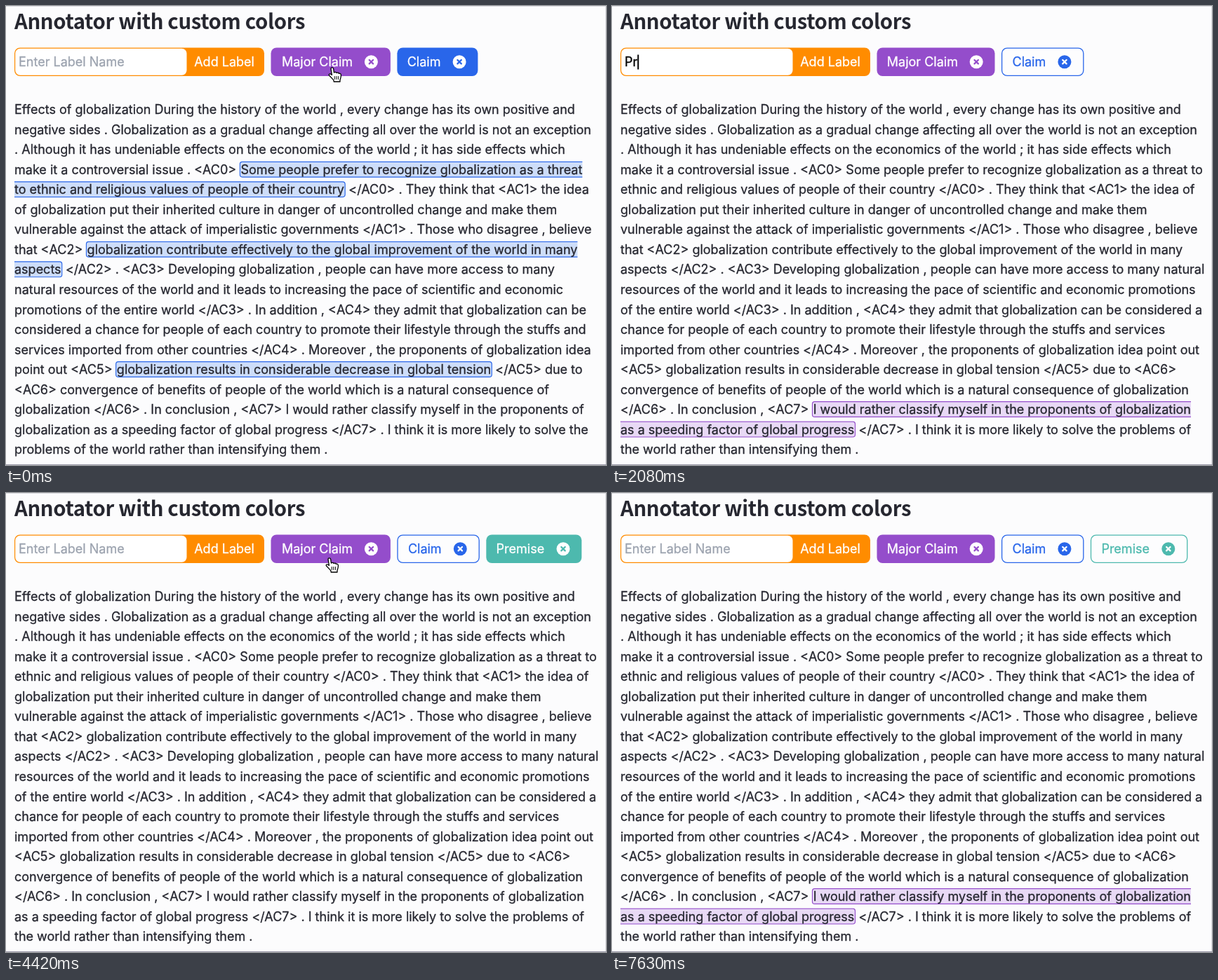
Write an HTML page with a canvas that moves like this. It is 855 by 655 pixels and loops after 7.67 s.

```html
<!DOCTYPE html>
<html lang="en">
<head>
<meta charset="utf-8">
<title>Annotator</title>
<style>
html, body { margin: 0; width: 100%; height: 100%; overflow: hidden; background: #fcfcfd; }
canvas { display: block; }
</style>
</head>
<body>
<canvas id="stage" width="855" height="655"></canvas>
<script>
const ctx = document.getElementById('stage').getContext('2d');
const LOOP = 7670;
const UI = '400 18px Inter, "Open Sans", sans-serif';
const HEAD = '700 29.3px "Noto Sans CJK JP", "Noto Sans CJK SC", "Noto Sans", sans-serif';
const INK = '#262730', ORANGE = '#ff8c00';
const LINE = 28.53, TOP = 59.5, HIGH = 40.5, ROUND = 8;

const labels = [
  { name: 'Major Claim', color: '#944dcb', tint: '#e8d9f5', width: 168 },
  { name: 'Claim', color: '#2966ea', tint: '#cdddf9', width: 115 },
  { name: 'Premise', color: '#4db9ae', tint: '#d8f0ee', width: 136 }
];

// Square brackets mark annotated spans; a span may continue on the next line.
const intro = [
  'Effects of globalization During the history of the world , every change has its own positive and',
  'negative sides . Globalization as a gradual change affecting all over the world is not an exception',
  '. Although it has undeniable effects on the economics of the world ; it has side effects which'
];
const claimText = [...intro,
  'make it a controversial issue . <AC0> [Some people prefer to recognize globalization as a threat',
  'to ethnic and religious values of people of their country] </AC0> . They think that <AC1> the idea',
  'of globalization put their inherited culture in danger of uncontrolled change and make them',
  'vulnerable against the attack of imperialistic governments </AC1> . Those who disagree , believe',
  'that <AC2> [globalization contribute effectively to the global improvement of the world in many',
  'aspects] </AC2> . <AC3> Developing globalization , people can have more access to many',
  'natural resources of the world and it leads to increasing the pace of scientific and economic',
  'promotions of the entire world </AC3> . In addition , <AC4> they admit that globalization can be',
  'considered a chance for people of each country to promote their lifestyle through the stuffs and',
  'services imported from other countries </AC4> . Moreover , the proponents of globalization idea',
  'point out <AC5> [globalization results in considerable decrease in global tension] </AC5> due to',
  '<AC6> convergence of benefits of people of the world which is a natural consequence of',
  'globalization </AC6> . In conclusion , <AC7> I would rather classify myself in the proponents of',
  'globalization as a speeding factor of global progress </AC7> . I think it is more likely to solve the',
  'problems of the world rather than intensifying them .'
];
const majorText = [...intro,
  'make it a controversial issue . <AC0> Some people prefer to recognize globalization as a threat to',
  'ethnic and religious values of people of their country </AC0> . They think that <AC1> the idea of',
  'globalization put their inherited culture in danger of uncontrolled change and make them',
  'vulnerable against the attack of imperialistic governments </AC1> . Those who disagree , believe',
  'that <AC2> globalization contribute effectively to the global improvement of the world in many',
  'aspects </AC2> . <AC3> Developing globalization , people can have more access to many natural',
  'resources of the world and it leads to increasing the pace of scientific and economic promotions',
  'of the entire world </AC3> . In addition , <AC4> they admit that globalization can be considered a',
  'chance for people of each country to promote their lifestyle through the stuffs and services',
  'imported from other countries </AC4> . Moreover , the proponents of globalization idea point out',
  '<AC5> globalization results in considerable decrease in global tension </AC5> due to <AC6>',
  'convergence of benefits of people of the world which is a natural consequence of globalization',
  '</AC6> . In conclusion , <AC7> [I would rather classify myself in the proponents of globalization',
  'as a speeding factor of global progress] </AC7> . I think it is more likely to solve the problems of',
  'the world rather than intensifying them .'
];
const plainText = majorText.map(s => s.replace(/[\[\]]/g, ''));

// Pointer path: time, x, y
const path = [
  [0, 465, 88], [220, 465, 88], [900, 197, 91], [3500, 197, 91], [4300, 461, 93],
  [4750, 461, 93], [5350, 513, 90], [5650, 513, 90], [6250, 640, -30], [LOOP, 640, -30]
];
const keys = [1880, 2030, 2200, 2380, 2520, 2660, 2800];
const FOCUS = 1300, ADDED = 3300;

function pointerAt(t) {
  const i = Math.max(1, path.findIndex(p => p[0] > t));
  const [a, b] = [path[i - 1], path[i]];
  const u = (t - a[0]) / (b[0] - a[0]);
  const e = u * u * (3 - 2 * u);
  return { x: a[1] + (b[1] - a[1]) * e, y: a[2] + (b[2] - a[2]) * e };
}

function selectedAt(t) {
  if (t < 240) return 1;
  if (t < ADDED) return 0;
  return t < 4750 ? 2 : 0;
}

function box(x, y, w, h, r, fill, stroke, lw) {
  ctx.beginPath();
  ctx.roundRect(x, y, w, h, r);
  if (fill) { ctx.fillStyle = fill; ctx.fill(); }
  if (stroke) { ctx.strokeStyle = stroke; ctx.lineWidth = lw; ctx.stroke(); }
}

// The hairline outline gives the slightly heavier look of smoothed screen text.
function write(s, x, y, color, font = UI, spacing = 0, outline = 0.3) {
  ctx.font = font;
  ctx.letterSpacing = spacing + 'px';
  ctx.fillStyle = ctx.strokeStyle = color;
  ctx.fillText(s, x, y);
  if (outline) {
    ctx.lineWidth = outline;
    ctx.lineJoin = 'round';
    ctx.strokeText(s, x, y);
  }
  return ctx.measureText(s).width;
}

function span(x, mid, w, left, right, label) {
  const y = mid - 10.9, h = 21.8, l = left ? 3.5 : 0, r = right ? 3.5 : 0;
  ctx.save();
  ctx.beginPath();
  ctx.rect(x - (left ? 1 : 0), y - 1, w + (left ? 1 : 0) + (right ? 1 : 0), h + 2);
  ctx.clip();
  const x0 = left ? x : x - 4, x1 = right ? x + w : x + w + 4;
  box(x0, y, x1 - x0, h, [l, r, r, l], label.tint, label.color, 1.2);
  ctx.restore();
}

function paragraph(lines, label) {
  let open = false;
  lines.forEach((line, i) => {
    const mid = 147.6 + i * LINE;
    let x = 12;
    for (const part of line.split(/([\[\]])/)) {
      if (part === '[') { open = true; continue; }
      if (part === ']') { open = false; continue; }
      if (!part) continue;
      if (!open) { x += write(part, x, mid + 6.6, INK); continue; }
      const left = line.includes('['), right = line.includes(']');
      ctx.font = UI;
      ctx.letterSpacing = '0px';
      const w = ctx.measureText(part).width + (left ? 1.2 : 0) + (right ? 1.2 : 0);
      span(x, mid, w, left, right, label);
      write(part, x + (left ? 1.2 : 0), mid + 6.6, INK);
      x += w;
    }
  });
}

function pill(label, x, w, chosen, filled) {
  const { color, name } = label, edge = chosen ? 0 : 1.2;
  const front = filled ? '#fff' : color, back = filled ? color : '#fff';
  if (filled) box(x, TOP, w, HIGH, ROUND, color);
  else box(x + .6, TOP + .6, w - 1.2, HIGH - 1.2, ROUND - .6, '#fdfdfe', color, 1.3);
  write(name, x + 14.3 + edge, 86.4, front);
  const cx = x + w - 26.3 - edge, cy = 79.7, d = 2.7;
  ctx.fillStyle = front;
  ctx.beginPath();
  ctx.arc(cx, cy, 9.5, 0, 7);
  ctx.fill();
  ctx.beginPath();
  ctx.moveTo(cx - d, cy - d); ctx.lineTo(cx + d, cy + d);
  ctx.moveTo(cx + d, cy - d); ctx.lineTo(cx - d, cy + d);
  ctx.strokeStyle = back;
  ctx.lineWidth = 2.3;
  ctx.lineCap = 'round';
  ctx.stroke();
}

function field(t) {
  box(12, TOP, 356, HIGH, ROUND, ORANGE);
  box(13.2, TOP + 1.2, 244.3, HIGH - 2.4, ROUND - 1, '#fff');
  write('Add Label', 268.2, 86.4, '#fff');
  const n = t < ADDED ? keys.filter(k => k <= t).length : 0;
  const typed = 'Premise'.slice(0, n);
  const w = n ? write(typed, 18, 86.4, '#000') : 0;
  if (!n) write('Enter Label Name', 18, 86.4, '#9ca3af');
  const since = t - (t < keys[0] ? FOCUS : keys[Math.max(0, n - 1)]);
  if (t >= FOCUS && t < ADDED && since % 1000 < 500) {
    ctx.fillStyle = '#000';
    ctx.fillRect(18 + w, 69.5, 2, 21);
  }
}

const hand = new Path2D('M-2 1.5 C-2 -.6 1.4 -.6 1.7 1.5 L2.4 7 C4 6 5.6 6.4 6 7.5 C7.4 6.7 9 7.2 9.3 8.4 ' +
  'C11 7.8 12.3 8.8 12.4 10.4 C12.7 14 11.6 15.6 11 17.4 L11 20 L2.3 20 L1.8 17.8 ' +
  'C-.2 15.8 -2.2 13 -4.4 11.2 C-5.6 9.8 -3.8 8.2 -2 9.3 L-.6 10.4 Z');
const arrow = new Path2D('M0 0 L0 16 L3.7 12.6 L6.2 18.3 L8.8 17.2 L6.3 11.6 L11.4 11.4 Z');
const beam = new Path2D('M-3.5 -7 Q0 -7 0 -4.5 Q0 -7 3.5 -7 M0 -5 L0 5 M-3.5 7 Q0 7 0 4.5 Q0 7 3.5 7 M-2 2.2 L2 2.2');

function pointer(p, onButton, onText) {
  ctx.save();
  ctx.translate(p.x, p.y);
  ctx.lineJoin = ctx.lineCap = 'round';
  if (onText) {
    ctx.strokeStyle = '#fff'; ctx.lineWidth = 3.4; ctx.stroke(beam);
    ctx.strokeStyle = '#000'; ctx.lineWidth = 1.5; ctx.stroke(beam);
  } else {
    const shape = onButton ? hand : arrow;
    ctx.fillStyle = onButton ? '#fff' : '#000';
    ctx.strokeStyle = onButton ? '#000' : '#fff';
    ctx.lineWidth = 1.3;
    ctx.fill(shape);
    ctx.stroke(shape);
    if (onButton) {
      ctx.beginPath();
      for (const x of [3.2, 5.8, 8.4]) { ctx.moveTo(x, 12.5); ctx.lineTo(x, 16.5); }
      ctx.lineWidth = 1;
      ctx.stroke();
    }
  }
  ctx.restore();
}

function draw(t) {
  const chosen = selectedAt(t), p = pointerAt(t);
  const shown = t < keys[0] || t >= 3500;
  const inRow = p.y >= TOP && p.y <= TOP + HIGH;

  ctx.fillStyle = '#fcfcfd';
  ctx.fillRect(0, 0, 855, 655);
  ctx.fillStyle = '#dddde2';
  ctx.fillRect(0, 0, 855, 1);
  ctx.fillRect(854, 0, 1, 655);
  ctx.fillStyle = '#9c9bab';
  ctx.fillRect(0, 654, 855, 1);

  write('Annotator with custom colors', 12, 32.6, INK, HEAD, -0.36, 0);
  field(t);

  let x = 377.5, onButton = inRow && p.x > 257 && p.x < 368;
  labels.slice(0, t < ADDED ? 2 : 3).forEach((label, i) => {
    const w = label.width + (i === chosen ? 0 : 2.4);
    const over = shown && inRow && p.x >= x && p.x <= x + w;
    onButton = onButton || over;
    pill(label, x, w, i === chosen, i === chosen || over);
    x += w + 9.5;
  });

  paragraph([majorText, claimText, plainText][chosen], labels[chosen]);
  if (shown) pointer(p, onButton, inRow && p.x > 12 && p.x <= 257);
}

function tick() {
  draw(performance.now() % LOOP);
  requestAnimationFrame(tick);
}
tick();
</script>
</body>
</html>
```
